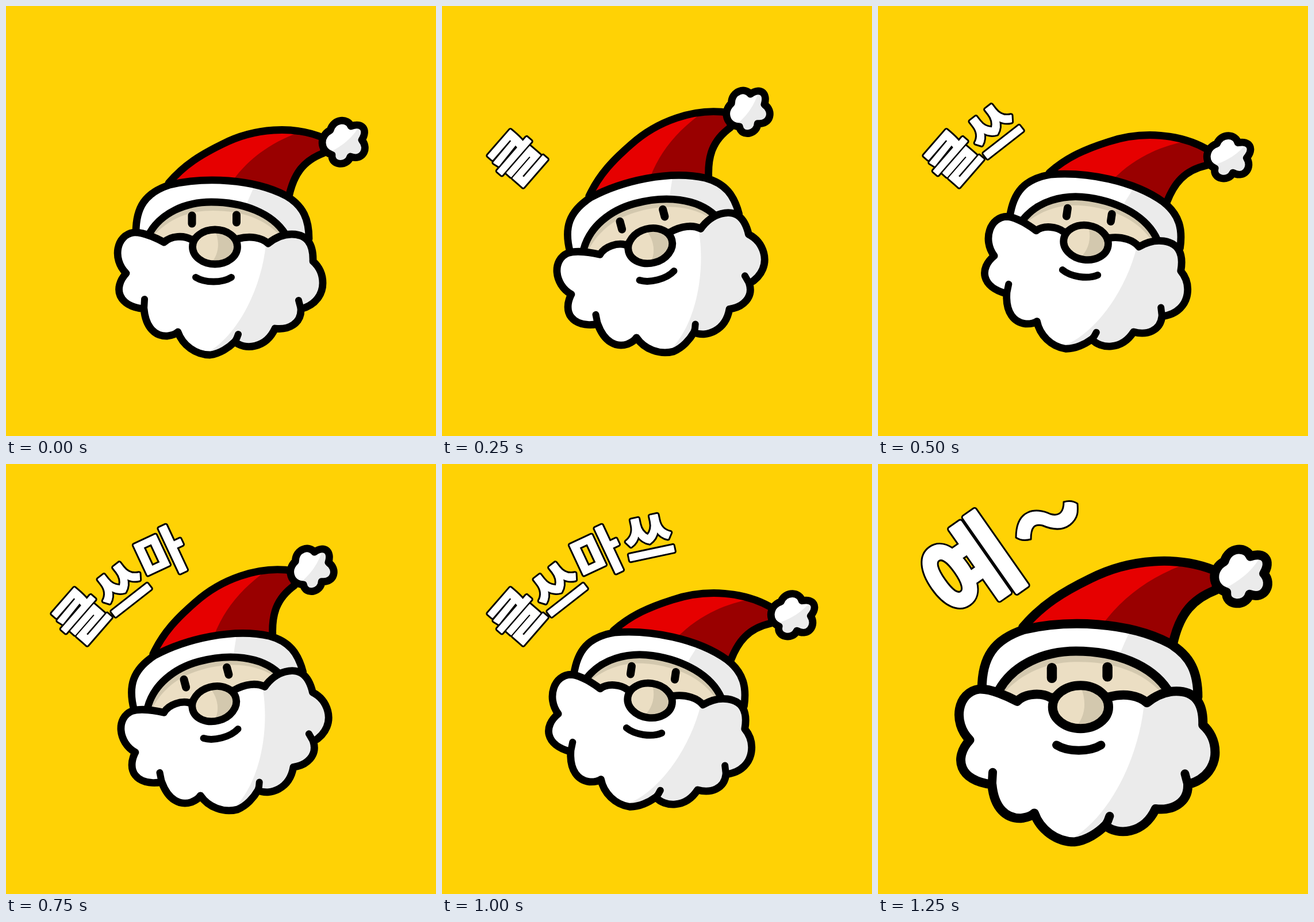
An HTML page that plays this animation: 748 by 748 pixels, repeating every 1500 ms.

```html
<!DOCTYPE html>
<html lang="ko">
<head>
<meta charset="utf-8">
<style>
html, body { margin: 0; height: 100%; overflow: hidden; background: #ffd205; }
svg { display: block; width: 100vw; height: 100vh; }
text { font: 900 92px "Noto Sans CJK KR", "Noto Sans CJK", sans-serif; text-anchor: middle; stroke-linejoin: round; }
.line { fill: none; stroke: #000; stroke-width: 12.8; stroke-linecap: round; stroke-linejoin: round; }
</style>
</head>
<body>
<svg viewBox="0 0 748 748">
  <g id="head"></g>
  <g id="words"></g>
</svg>
<script>
const head = document.getElementById("head");
const words = document.getElementById("words");

// A filled shape, a shade clipped to it, then its outline
let clips = 0;
function part(d, fill, shade, shadeFill) {
  const id = "clip" + clips++;
  return `<clipPath id="${id}"><path d="${d}"/></clipPath>
    <path d="${d}" fill="${fill}"/>
    <path d="${shade}" fill="${shadeFill}" clip-path="url(#${id})"/>
    <path d="${d}" class="line"/>`;
}
const line = (d, width = 12) => `<path d="${d}" class="line" style="stroke-width:${width}"/>`;

const white = "#fff", grey = "#ebebeb", skin = "#ebdec3", tan = "#d3c8ae";

head.innerHTML =
  // hat
  part("M283,308 C310,276 340,258 377,240 C430,213 500,206 556,231 L552,256 C515,270 500,295 492,332",
    "#e60000", "M530,212 C470,232 428,258 394,304 L490,345 L570,260 L570,210Z", "#990000") +
  // pompom
  part("M564,216 C570,195 595,195 600,209 C620,202 630,215 619,233 C632,248 620,270 599,262 C594,280 565,278 567,259 C545,252 545,226 564,216Z",
    white, "M618,203 C605,228 585,245 555,258 L560,290 L640,290 L640,203Z", grey) +
  // brim
  part("M226,394 C226,350 242,325 285,311 C345,297 430,300 487,330 C518,348 527,372 527,405",
    white, "M440,290 C432,318 424,328 416,352 L540,420 L540,290Z", grey) +
  // face
  part("M250,440 V395 C270,360 312,341 357,341 C412,341 463,360 486,397 V440",
    tan, "M254,402 C285,368 320,356 360,356 C410,356 450,370 477,400 V440 H254Z", skin) +
  // beard
  part("M322,406 C310,399 287,399 275,411 C262,404 238,393 222,394 C192,398 184,440 209,465 C186,490 194,522 240,527 " +
    "C243,560 260,575 281,574 C289,573 295,571 299,567 C307,590 330,607 355,607 C372,605 388,594 398,584 " +
    "C415,599 452,596 468,561 C492,564 514,552 513,527 C540,520 551,500 551,482 C551,465 543,452 534,444 " +
    "C535,412 522,397 497,397 C480,397 467,404 456,413 C445,403 425,399 403,405Z",
    white, "M453,400 C450,480 406,575 345,606 L560,620 L560,380Z", grey) +
  line("M241,510 L240,527 M398,584 Q402,578 404,571 M509,512 L513,527") +
  // nose, smile, eyes
  part("M324.5,419 a39,30 0 1 1 78,0 a39,30 0 1 1 -78,0Z",
    skin, "M361,385 C374,410 371,435 352,452 H410 V385Z", tan) +
  line("M330,472 C346,482 376,482 392,472") +
  line("M323.5,364.5 V378.5 M401,363.5 V376.5", 14);

function word(text, x, y, angle, size = 92, grow = 2.5) {
  const copy = (color, width) =>
    `<text dy=".38em" style="font-size:${size}px" fill="${color}" stroke="${color}" stroke-width="${width}">${text}</text>`;
  return `<g transform="translate(${x} ${y}) rotate(${angle})">${copy("#000", grow + 6)}${copy("#fff", grow)}</g>`;
}

const greeting = [
  word("클", 129, 264, -49),
  word("쓰", 201, 215, -38),
  word("마", 270, 157, -25),
  word("쓰", 359, 128, -12),
];
const cheer = word("예", 160, 182, -35, 172, 5) +
  `<path d="M266,131 C266,110 272,104 286,107 C300,113 318,118 334,106 C349,94 348,82 347,69 Q337,62 323,66
    C323,80 318,92 300,87 C275,75 240,78 240,128 Q250,135 266,131Z"
    fill="#fff" stroke="#000" stroke-width="3" stroke-linejoin="round"/>`;

const pose = (x, y, angle, scale = 1) =>
  `translate(${x} ${y}) rotate(${angle}) scale(${scale}) translate(-364 -420)`;
const rest = pose(364, 420, 0);
const left = pose(363, 418, -15);
const right = pose(362, 412.5, 8.3);
const close = pose(353, 424, 0, 1.248);
const poses = [rest, left, right, left, right, close];

let shown = -1;
function draw(now) {
  const step = Math.floor(now % 1500 / 250);
  if (step !== shown) {
    shown = step;
    head.setAttribute("transform", poses[step]);
    words.innerHTML = step === 5 ? cheer : greeting.slice(0, step).join("");
  }
}

const start = performance.now();
function tick() {
  draw(performance.now() - start);
  requestAnimationFrame(tick);
}
tick();
</script>
</body>
</html>
```
